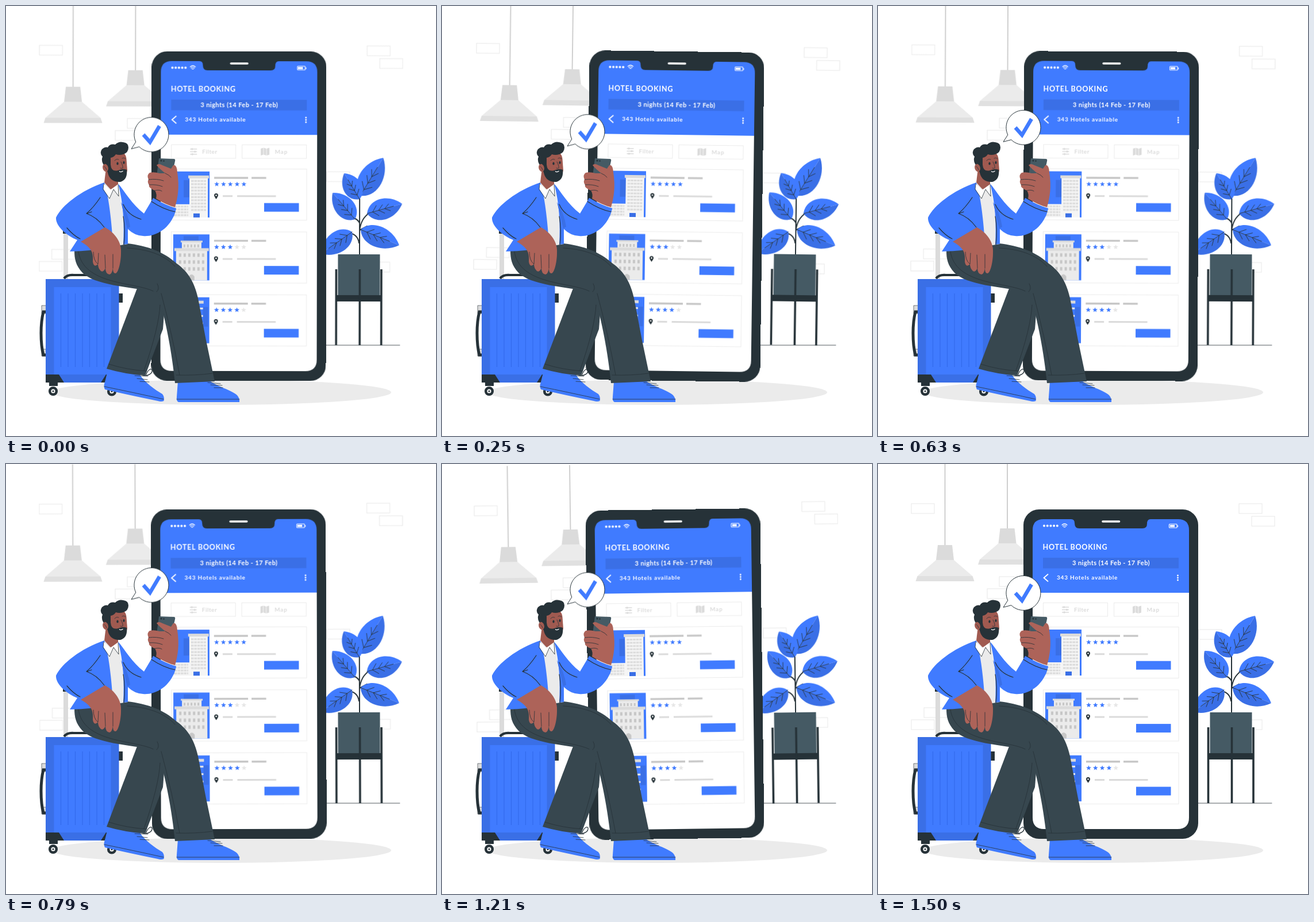
An HTML page that plays this animation: 748 by 748 pixels, repeating every 1540 ms.

```html
<!DOCTYPE html>
<html lang="en">
<head>
<meta charset="utf-8">
<title>Hotel booking</title>
<style>
  html, body { margin: 0; width: 100%; height: 100%; overflow: hidden; background: #fff; }
  svg { display: block; width: 100vw; height: 100vh; }
  text { font-family: Lato, "Open Sans", sans-serif; font-weight: 700; }
  .blue { fill: #407bff; }
  .deep { fill: #3a6fe6; }
  .dark { fill: #263238; }
  .skin { fill: #ad6359; }
  .face { fill: #a05a50; }
  .pants { fill: #37474f; }
  .line { fill: none; stroke: #263238; stroke-width: 1.2; stroke-linecap: round; stroke-linejoin: round; }
  .thin { stroke-width: .8; }
  .box { fill: #fff; stroke: #ebebeb; }
  #room { transform-origin: 374px 231px; }
  #phone { transform-origin: 405px 365px; }
  #plant { transform-origin: 623px 427px; }
</style>
</head>
<body>
<svg viewBox="0 0 748 748">
  <g id="room">
    <g id="bricks" fill="none" stroke="#e8e8e8"></g>
    <g id="lamps"></g>
  </g>
  <ellipse cx="374" cy="672" rx="296" ry="22" fill="#ebebeb"/>
  <path class="line thin" d="M540 590H685"/>

  <g id="plant">
    <path class="line" style="stroke-width:2" d="M615 434V328M615 391Q617 370 632 360M615 378Q613 372 604 368M614 412Q612 398 598 395M615 390L628 383"/>
    <g id="leaves"></g>
    <rect x="577.5" y="432" width="73" height="72" fill="#455a64"/>
    <rect class="dark" x="574" y="503" width="80" height="11"/>
    <path d="M574.5 458V590M615.5 458V590M653 458V590" stroke="#263238" stroke-width="3.6"/>
  </g>

  <g id="phone">
    <rect class="dark" x="253" y="79" width="304" height="573" rx="27"/>
    <path d="M269 220H541V615Q541 635 521 635H289Q269 635 269 615Z" fill="#fff"/>
    <path class="blue" d="M269 224V115Q269 96 288 96H336Q342 96 342 103Q342 112 350 112H460Q468 112 468 104Q468 96 474 96H522Q541 96 541 115V224Z"/>
    <path d="M391 100H419.5" stroke="#fff" stroke-width="3.6" stroke-linecap="round"/>
    <path d="M289 107.5H313" stroke="#fff" stroke-width="4" stroke-linecap="round" stroke-dasharray="0 5.7"/>
    <g fill="none" stroke="#fff" stroke-width="1.2" stroke-linecap="round">
      <path d="M320 106Q324.500 102 329 106M321.600 108Q324.500 105.500 327.400 108M323.300 109.800Q324.500 108.800 325.700 109.800"/>
      <rect x="506.5" y="104.5" width="13.5" height="6.5" rx="1"/>
      <path d="M521.5 107V109"/>
    </g>
    <rect x="508" y="106" width="8" height="3.6" fill="#fff"/>
    <rect class="deep" x="287" y="163" width="236" height="18.5"/>
    <g fill="#fff">
      <text x="286.5" y="149.3" font-size="12.600" letter-spacing=".72">HOTEL BOOKING</text>
      <text x="338" y="176" font-size="11" letter-spacing=".45">3 nights (14 Feb - 17 Feb)</text>
      <text x="311" y="201.2" font-size="10" letter-spacing=".8">343 Hotels available</text>
    </g>
    <path d="M296 191.5L288.5 198L296 204.5" fill="none" stroke="#fff" stroke-width="1.8"/>
    <path d="M521.5 194V203" stroke="#fff" stroke-width="2.8" stroke-linecap="round" stroke-dasharray="0 4"/>
    <rect class="box" x="287.5" y="241.5" width="112" height="23.5"/>
    <rect class="box" x="410.5" y="241.5" width="112" height="23.5"/>
    <g fill="#dbdbdb">
      <text x="341" y="257" font-size="10" letter-spacing=".5">Filter</text>
      <text x="467.5" y="257" font-size="10" letter-spacing=".8">Map</text>
      <path d="M443 248L447.500 246.500V258.500L443 260ZM448.300 246.500L452.500 248V260L448.300 258.500ZM453.300 248L458 246.500V258.500L453.300 260Z"/>
      <path d="M320 249H332M320 253.5H332M320 258H332" stroke="#dbdbdb" stroke-width="1.3"/>
      <circle cx="323.5" cy="249" r="1.7"/><circle cx="328.5" cy="253.5" r="1.7"/><circle cx="324" cy="258" r="1.7"/>
    </g>
    <g id="cards"></g>
  </g>

  <g id="suitcase">
    <path d="M100 390H108V476H100Z" fill="#dbdbdb"/>
    <path class="dark" d="M99 386H109V396H99ZM196 500H203V516H196Z"/>
    <path d="M101 474Q106 467 118 468H146" fill="none" stroke="#263238" stroke-width="4"/>
    <path d="M62 521H70V535H62ZM62 597H70V609H62Z" fill="#dbdbdb" stroke="#263238" stroke-width=".6"/>
    <path d="M70 532H65Q61 548 61 569Q61 592 65 607H70" fill="none" stroke="#263238" stroke-width="5"/>
    <rect class="deep" x="69" y="475" width="127.5" height="180"/>
    <rect class="blue" x="83.5" y="489" width="99" height="152"/>
    <path d="M95.5 500V628M108 500V628M120.5 500V628M133 500V628M145.5 500V628M158 500V628M170.5 500V628" stroke="#326aeb" stroke-width="1.1"/>
    <path class="dark" d="M69 641H92L101 655H69ZM196 641H174L165 655H196ZM75 655H90V661H75ZM177 655H192V662H177Z"/>
    <g fill="#fff" stroke="#263238" stroke-width="4.5"><circle cx="82" cy="670" r="5.8"/><circle cx="184" cy="670.5" r="5.8"/></g>
    <g class="dark"><circle cx="82" cy="670" r="1.6"/><circle cx="184" cy="670.5" r="1.6"/></g>
  </g>

  <g id="guest">
    <path class="line" d="M238 643C248 644 255 639 254 633C252 629 246 634 243 643"/>
    <path class="blue" d="M178 630L232 640C241 655 260 668 272 675Q276 680 274.500 687Q270 689 264 687Q210 676 172 667Q169 661 172 654Z"/>
    <path class="blue" d="M299 653L354 652C368 662 392 668 402 677Q407 683 406 689H300Q296 687 297 680Z"/>
    <path class="line thin" d="M171 662Q220 672 274 684M297 684H406M224 643L247 644M228 648L246 650M233 653L249 654M351 655L373 657M356 659L376 660M362 664L377 664"/>
    <path class="pants" d="M230 486L175 631Q205 640 242 643L273 562L280 470Z"/>
    <path class="line thin" d="M179 623Q210 633 245 635M268 520Q266 560 240 634"/>
    <path class="pants" d="M119 425L211 413C245 417 274 427 297 448C318 463 328 482 334 508Q347 580 363 653L294 656C289 605 278 545 263 497C211 489 154 485 133 464C121 451 119 440 119 425Z"/>
    <path class="line thin" d="M126 427C134 486 225 480 256 496M211 421C245 423 275 432 294 453M262 497Q268 492 263 483M270 500Q290 575 302 642M296 642Q330 643 359 639"/>

    <path d="M168 308L195 307L212 414L170 421Z" fill="#ebebeb"/>
    <path class="blue" d="M171 307C130 321 97 347 87 368C86 383 106 400 124 407L111 427Q150 426 186 419C185 390 180 335 171 307Z"/>
    <path class="blue" d="M195 309C207 323 219 345 240 361L256 334Q278 347 296 352C290 382 266 399 245 400Q226 402 212 388L212 414L204 415C206 380 204 342 195 309Z"/>
    <path class="deep" d="M200 341Q213 362 216 384L211 387Z"/>
    <path class="line" d="M164 333Q152 351 140 361Q158 367 171 385M141 361L149 358M106 386Q118 400 129 405M204 345Q212 364 235 371M205 415Q208 388 204 366"/>
    <path class="skin" d="M130 410L172 385C189 394 202 411 200 430C200 444 196 463 191 465Q186 466 186 456Q184 467 180 467Q173 466 173 456Q169 464 165 461Q160 456 160 449Q153 456 151 445C152 430 150 421 130 410Z"/>
    <path class="line thin" d="M152 428Q152 443 160 449L161 430M173 456L172 433M186 456L186 432"/>

    <path class="face" d="M174 282L195 292V314Q189 324 181 318L171 307Z"/>
    <path d="M170 309L181 320L195 310L196 331L188 319L180 335L169 318Z" fill="#fff"/>
    <path class="line thin" d="M170 309L169 319L180 335L187 319L196 331L195 311"/>
    <path class="face" d="M173 268Q176 255 193 252Q208 252 209.500 266L211 286Q207 303 193 304Q179 301 174 284Z"/>
    <path class="dark" d="M174 282Q164 271 168 262Q162 256 167 249Q172 244 177 246Q181 239 190 241Q196 235 204 237Q213 238 213 246Q213 255 204 258Q197 260 191 258Q188 263 182 264L182 276Q183 289 195 286Q204 282 210 285Q212 302 199 306Q181 307 177 290Z"/>
    <ellipse class="face" cx="173" cy="281.500" rx="4.800" ry="6.800" transform="rotate(-15 173 281.500)"/>
    <path class="line thin" d="M171 279Q174 281 175 285M189 269Q192 265 196 267M202 265Q206 263 208 266M200 271Q204 279 203 282Q202 283 199 282"/>
    <path d="M197 287.500Q200 290 203.500 287" fill="none" stroke="#fff" stroke-width="1.1"/>
    <ellipse class="dark" cx="194" cy="274" rx="1.7" ry="2.5"/><ellipse class="dark" cx="205" cy="272.5" rx="1.6" ry="2.4"/>

    <path class="dark" d="M264 265H268L258 321L256 317Z"/>
    <path d="M266 265L292 266Q295 266 294 270L283 320L259 319Z" fill="#455a64"/>
    <circle class="dark" cx="270" cy="269" r="1.6"/><circle class="dark" cx="274.5" cy="269.5" r="1.3"/>
    <path class="skin" d="M250 290Q257 288 267 291L277 291Q267 283 262 277Q265 273 272 277L287 283L291 277Q297 275 298 289C302 315 299 333 294 350Q278 346 261 335Q263 327 259 321Q247 316 249 311Q245 306 248 302Q244 294 250 290Z"/>
    <path class="line thin" d="M248 302Q262 300 274 304M249 311Q262 310 272 314M259 321Q267 319 271 322M277 291Q284 294 287 298"/>
    <path class="blue" d="M256 334Q278 347 296 352L292 366L250 349Z"/>
    <path class="line" d="M253 340Q274 354 294 358"/>
  </g>

  <g id="bubble">
    <path d="M225.800 237.200L218 249.300L231.800 245.700A30 30 0 1 0 225.800 237.200Z" fill="#fff" stroke="#263238" stroke-linejoin="round"/>
    <path d="M239 224.500L250.500 237.500L267 209.500" fill="none" stroke="#407bff" stroke-width="6.5"/>
  </g>
</svg>

<script>
const $ = id => document.getElementById(id);
const fill = (id, parts) => { $(id).innerHTML = parts.join(''); };
const rect = (x, y, w, h, color) => `<rect x="${x}" y="${y}" width="${w}" height="${h}" fill="${color}"/>`;
const dash = (x1, x2, y, color, width, gaps = 'none') =>
  `<path d="M${x1} ${y}H${x2}" stroke="${color}" stroke-width="${width}" stroke-dasharray="${gaps}"/>`;
const rows = (n, draw) => Array.from({ length: n }, (_, i) => draw(i)).join('');

const BLUE = '#407bff', DEEP = '#3a6fe6', PALE = '#ebebeb', GREY = '#c7c7c7', MID = '#dbdbdb';

fill('bricks', [[58, 69], [628, 69], [650, 91], [58, 445], [80, 424], [190, 217], [211, 196], [558, 288], [628, 445]]
  .map(([x, y]) => `<rect x="${x}" y="${y}" width="40" height="17"/>`));

const lamp = (x, y) => `<path d="M${x} 0V${y}" stroke="#c7c7c7" stroke-width="1.7"/>
  <g transform="translate(${x} ${y})">
    <path d="M-12.5 0H12.5L15.5 26H-15.5Z" fill="#dbdbdb"/>
    <path d="M-15.5 26H15.5L48 54H-48Z" fill="#ebebeb"/>
    <path d="M-48 54H48L51 63H-51Z" fill="#e0e0e0"/>
  </g>`;
fill('lamps', [lamp(116.5, 141), lamp(225, 112)]);

// Each leaf runs from base to tip; w is its half width. The lower half is shaded.
function leaf([bx, by, tx, ty, w]) {
  const dx = tx - bx, dy = ty - by, len = Math.hypot(dx, dy), k = w * 1.35;
  const low = Math.sign(dx);
  const half = s => `M0 0C${len * .15} ${s * k} ${len * .7} ${s * k} ${len} 0Z`;
  const veins = rows(3, i => {
    const x = len * (.16 + i * .17), r = w * (.5 - i * .08);
    return `M${x} 0L${x + len * .14} ${r}M${x} 0L${x + len * .14} ${-r}`;
  });
  return `<g transform="translate(${bx} ${by}) rotate(${Math.atan2(dy, dx) * 180 / Math.PI})">
    <path class="blue" d="${half(-low)}"/><path class="deep" d="${half(low)}"/>
    <path class="line thin" d="M0 0H${len * .75}${veins}"/></g>`;
}
fill('leaves', [
  [616, 330, 656, 264, 20], [615, 336, 588, 291, 16], [607, 371, 568, 325, 17],
  [628, 361, 689, 344, 18], [617, 389, 684, 416, 18], [602, 393, 548, 431, 18]
].map(leaf));

function star(cx, cy, color) {
  const pts = Array.from({ length: 10 }, (_, i) => {
    const a = (i / 5 - .5) * Math.PI, r = i % 2 ? 2 : 4.6;
    return `${(cx + r * Math.cos(a)).toFixed(1)},${(cy + r * Math.sin(a)).toFixed(1)}`;
  });
  return `<polygon points="${pts.join(' ')}" fill="${color}"/>`;
}

const tower = () =>
  rect(309, 303, 10, 30, DEEP) + rect(291, 345, 28, 23, '#f5f5f5') + rect(319, 299, 32, 69, '#f5f5f5') +
  rect(317, 295, 36, 5, MID) +
  rows(10, i => dash(322, 348, 304.5 + i * 5.6, MID, 3, '4.5 1')) +
  rows(4, i => dash(293, 317, 349 + i * 5, MID, 3, '4.5 1')) +
  rect(326, 361, 11, 7, DEEP);

const palace = () =>
  rect(309, 291, 26, 9, DEEP) + rect(306, 301, 34, 12, PALE) + rect(304, 299, 38, 3, MID) +
  dash(309, 337, 308, GREY, 5, '3 3') + rect(296, 316, 54, 52, PALE) + rect(293, 312, 60, 5, MID) +
  rows(3, i => dash(301, 346, 324 + i * 12, GREY, 6, '4 4')) +
  '<path d="M318 368V361Q323 354 328 361V368Z" fill="#c7c7c7"/>';

const block = () =>
  rect(343, 305, 9, 34, DEEP) + rect(298, 294, 46, 5, MID) +
  rows(4, i => rect(300, 306 + i * 13, 43, 3, PALE));

const card = (draw, score, i) => `<g transform="translate(0 ${i * 109.4})">
  <rect class="box" x="287.5" y="283.5" width="235.5" height="89"/>
  ${rect(291, 288, 63, 80, BLUE)}${draw()}
  ${dash(362, 421, 299, GREY, 3.4)}${dash(427, 452.5, 299, GREY, 3.4)}
  ${rows(5, n => star(366.5 + n * 11.8, 310, n < score ? BLUE : '#e6e6e6'))}
  <path class="dark" d="M365.5 336Q362 331 362 329.5A3.5 3.5 0 0 1 369 329.5Q369 331 365.5 336Z"/>
  <circle cx="365.5" cy="329.5" r="1.3" fill="#fff"/>
  ${dash(377, 394, 330.7, MID, 3)}${dash(402, 469.5, 330.7, MID, 3)}
  ${rect(449, 342.7, 60.5, 15, BLUE)}</g>`;
fill('cards', [card(tower, 5, 0), card(palace, 3, 1), card(block, 4, 2)]);

const clock = { duration: 1540, delay: -40, iterations: Infinity };
const sway = [[0, 0], [.25, 1], [.75, -1], [1, 0]].map(([offset, deg]) => ({ offset, transform: `rotate(${deg}deg)` }));
const hover = [0, -15, 0].map(y => ({ transform: `translateY(${y}px)` }));
for (const id of ['room', 'phone', 'plant']) $(id).animate(sway, clock);
$('bubble').animate(hover, clock);
</script>
</body>
</html>
```
